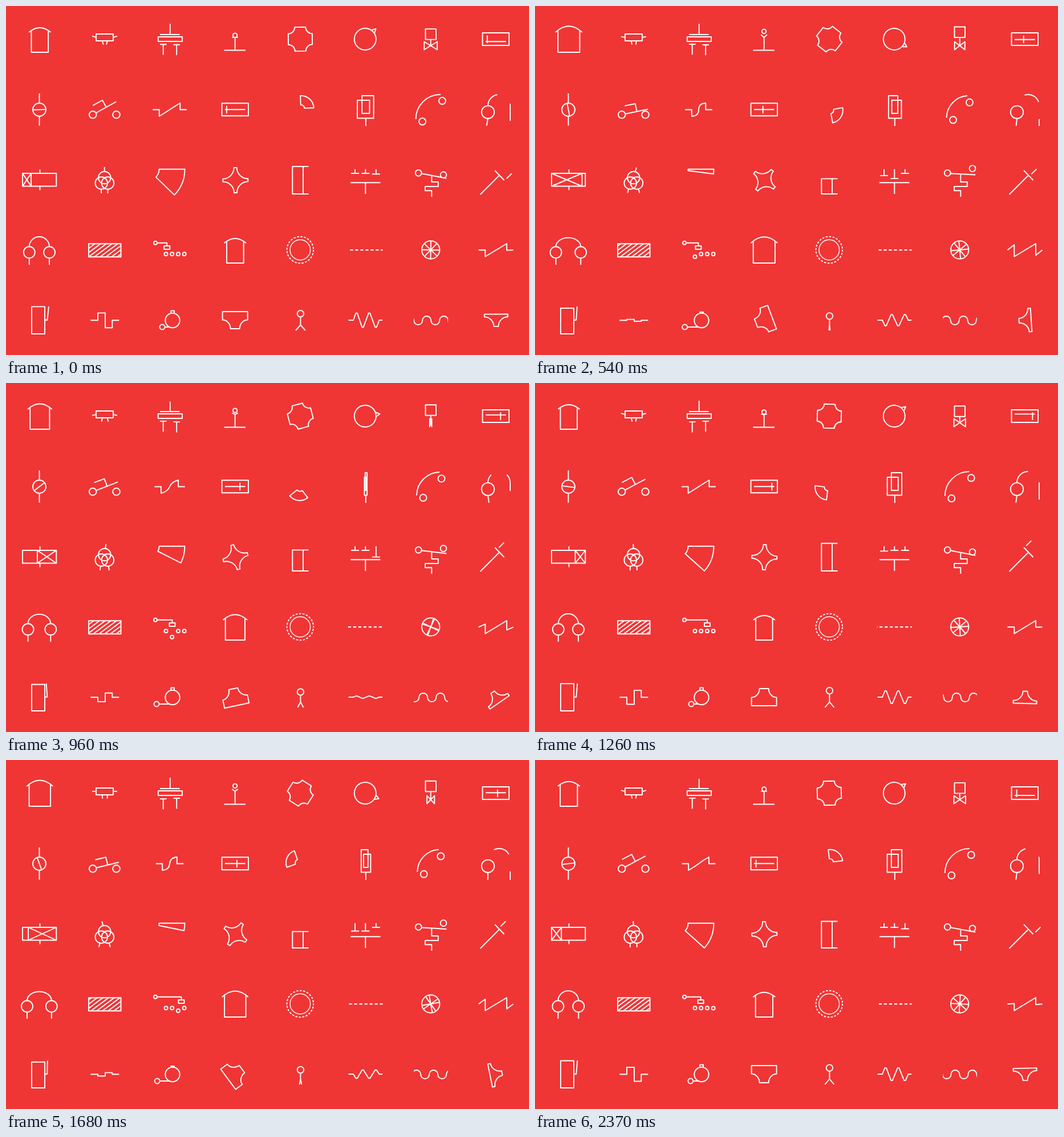
These frames come from a looping animation (917 px wide and 611 px high, 2.4 s). An HTML page with a canvas:

```html
<!DOCTYPE html>
<html>
<head>
<meta charset="utf-8">
<style>
html, body { margin: 0; height: 100%; overflow: hidden; background: #f03535; }
canvas { display: block; }
</style>
</head>
<body>
<canvas width="917" height="611"></canvas>
<script>
const ctx = document.querySelector('canvas').getContext('2d');
const LOOP = 2400;
const rad = Math.PI / 180;
const smooth = x => x * x * (3 - 2 * x);
const smoother = x => x * x * x * (x * (6 * x - 15) + 10);
const clamp = x => Math.max(0, Math.min(1, x));
const bump = (x, peak, width) => Math.max(0, 1 - Math.abs(x - peak) / width);
const circle = (x, y, r) => `M${x + r},${y}a${r},${r} 0 1 1 ${-2 * r},0a${r},${r} 0 1 1 ${2 * r},0Z`;
const box = (x0, y0, x1, y1) => `M${x0},${y0}H${x1}V${y1}H${x0}Z`;
const polar = (x, y, r, deg) => `${x + r * Math.cos(deg * rad)},${y + r * Math.sin(deg * rad)}`;

function draw(d, x = 0, y = 0, deg = 0) {
  ctx.save();
  ctx.translate(x, y);
  ctx.rotate(deg * rad);
  ctx.stroke(new Path2D(d));
  ctx.restore();
}

function clipped(x, y, w, h, paint) {
  ctx.save();
  ctx.beginPath();
  ctx.rect(x, y, w, h);
  ctx.clip();
  paint();
  ctx.restore();
}

function dashed(d, dash, offset, x, y) {
  ctx.setLineDash(dash);
  ctx.lineDashOffset = offset;
  draw(d, x, y);
  ctx.setLineDash([]);
}

// Four flat sides joined by concave corners
function concaveCross(R, h) {
  const arc = `A${R - h},${R - h} 0 0 0 `;
  return `M${-h},${-R}H${h}${arc}${R},${-h}V${h}${arc}${h},${R}H${-h}${arc}${-R},${h}V${-h}${arc}${-h},${-R}Z`;
}

function tee(top, foot, h, shoulder) {
  const arc = `A${top - foot},${h - shoulder} 0 0 0 `;
  return `M${-top},${-h}H${top}V${shoulder}${arc}${foot},${h}H${-foot}${arc}${-top},${shoulder}Z`;
}

function house(x, y, o) {
  const w = 14.7 + 4.6 * o, W = w + 4.2, rise = 8 + 2.8 * o;
  const eave = -35 - rise * (1 - (w / W) ** 2);
  draw(`M${-w},${eave}V0H${w}V${eave}M${-W},-35Q0,${-35 - 2 * rise} ${W},-35`, x, y);
}

function gauge(x, y, lineY, v) {
  const tick = x + 8 + 30 * v;
  draw(box(x, y, x + 46.5, y + 22) + `M${x + 5.5},${lineY}h35.5M${tick},${y + 4.5}v13.5`);
}

function render(now) {
  const t = (now - 15 + LOOP) % LOOP;
  const half = t % 1200, p = half / 1200, P = t / LOOP;
  const u = 1 - Math.abs(1 - 2 * p);
  const v = 1 - Math.abs(1 - 2 * P);
  const flap = 4 * Math.abs(t / 600 % 1 - .5) - 1;
  const o = p < .5 ? smooth(2 * p) : 1 - (2 * p - 1) ** 1.35;
  const flip = 1 - 2 * u;

  ctx.fillStyle = '#f03535';
  ctx.fillRect(0, 0, 917, 611);
  ctx.strokeStyle = '#fff';
  ctx.lineWidth = 1.9;
  ctx.lineJoin = 'round';

  // Row 1
  house(59.3, 81, o);

  draw(box(158, 49, 188, 61) + `M158,55L151,${55 - 2.7 * flap}M188,55L195,${55 - 2.7 * flap}`
    + `M168.8,61.5L${169 + 2 * flap},67.5M177.8,61.5L${177.8 - 2 * flap},67.5`);

  const rod = 31 + 2 * bump(t % 200, 155, 35), hop = .6 * Math.sin(t / 100 * Math.PI);
  draw(`M287.7,${rod}V50M270,50H304.5` + box(266.8, 54, 309, 62)
    + `M270,${67.5 + hop}h11.5m-5.8,0v18.3M293.5,${67.5 - hop}h11.5m-5.8,0v18.3`);

  draw(circle(401.6, 51.5 - 8 * u, 3.7) + 'M382.5,77.5H420M401.6,77.5V55'
    + `M396.3,${55 - 5.5 * u}L401.6,55L406.9,${55 - 5.5 * u}`);

  const turn = 90 * (p + smooth(p)) / 2;
  draw(concaveCross(21, 9.5), 516, 58, turn);

  draw(circle(0, 0, 19) + `M${polar(0, 0, 19, -12)}L26,0L${polar(0, 0, 19, 12)}`, 629.8, 58, -46 + 88 * u);

  const bow = 12 * flip, sy = 40.3 - 4 * o;
  draw(box(735.5, sy, 754, sy + 18.5) + `M744.7,${sy + 18.5}V69.5`
    + `M${744.7 - bow},62.5V76.5L${744.7 + bow},62.5V76.5Z`);

  gauge(835.5, 47, 62.3 - 8.2 * v, v);

  // Row 2
  draw(circle(58.5, 181.5, 11.5) + 'M58.5,153V170M58.5,193V209.5');
  draw('M-11.5,0H11.5', 58.5, 181.5, 180 * p);

  draw(circle(152.2, 190.3, 6.3) + circle(193.5, 190.3, 6.3));
  draw('M6.3,0H47M8,-14H27V0', 152.2, 190.3, -29.5 + 20 * u);

  const zw = 18.5 - 6.5 * o, cx = zw / 2 * (1 - o), cy = 5.75 + 5.75 * o;
  draw(`M${-zw - 11.5},0H${-zw}V11.5Q${-cx},${cy} 0,0Q${cx},${-cy} ${zw},-11.5V0h11.5`, 287, 181.5);

  gauge(378.5, 170.3, 181.3, v);

  draw('M1.5,-24A22.5,22.5 0 0 1 24.3,-1.8H8A6.5,6.5 0 0 0 1.5,-8Z', 515.5, 181, 360 * P);

  const fx = x => 630.8 + x * flip;
  draw(`M${fx(-7)},188V157H${fx(14.5)}V196.5H${fx(-15.5)}V165H${fx(7)}V188ZM630.8,196.5V210`);

  draw(`M${718.5 + 3.5 * u},${198 - 3 * u}A${43 - 4 * u},${43 - 4 * u} 0 0 1 ${762 - 4.5 * u},${155 + 2.2 * u}`
    + circle(765 - 3.5 * u, 166 + 3.2 * u, 6) + circle(730 + 3.5 * u, 202.3 - 3.2 * u, 6));

  draw(circle(845, 185.8, 11.2) + `M845,197L${845 - 2.6 * flap},209.7`);
  dashed('M845,174.5A19.5,19.5 0 0 1 884,174.5V210', [30, 30], -(58 + 60 * p));

  // Row 3
  const left = P < .25 || P > .75 ? 29 : 74 - 45 * u;
  const right = P < .25 || P > .75 ? 43 + 45 * u : 88.3;
  draw(box(29, 293, 88.3, 315.5) + box(left, 293, right, 315.5)
    + `M${left},293L${right},315.5M${left},315.5L${right},293M59.5,286V293M59.5,315.5V322.5`);

  draw(circle(172.8, 300.5, 10.8) + circle(167.2, 310, 10.8) + circle(178.4, 310, 10.8));
  const lean = (P < .5 ? 18 : -18) * u;
  draw('M0,-11V-18.5', 172.8, 300.5, lean);
  draw('M0,11V18', 167.2, 310, 18 * u);
  draw('M0,11V18', 178.4, 310, -18 * u);

  const fan = 45 - 43 * u;
  draw(`M20,0H65A65,65 0 0 1 ${polar(0, 0, 65, fan)}L${polar(0, 0, 20, fan)}A20,20 0 0 0 20,0Z`, 248.5, 285.7);

  draw(concaveCross(22, 2.5), 402.3, 305, turn);

  const lid = 280.3 + 23 * o;
  draw(`M530.5,${lid}H502.3V329H530.5M521,${lid}V329`);

  draw('M604,309.3H656.5M630.3,309.3V329');
  [612, 630.3, 648.8].forEach((x, i) => {
    const y = 293 + 13 * bump(half, 315 + 300 * i, 300);
    draw(`M${x},285.7V${y}M${x - 7},${y}h14`);
  });

  const tip = 302 - 6.8 * o;
  draw(circle(723.2, 292.3, 5.4) + circle(767, 296 - 12 * o, 5.4) + `M728.5,293.3L772.3,${tip}`
    + `M746.3,${(293 + tip) / 2 - .5}V308H757.8V316H735V323.3H746.3V334`);

  draw('M831.5,330L865,296.5M857,287.8L873.5,305');
  draw('M878,302.2L887,293.3', -17.5 * v, -17.8 * v);

  // Row 4
  const ear = 17.5 + 4.5 * o, band = 17.3 - 1.7 * o;
  draw(circle(58.4 - ear, 431.3, 10) + circle(58.4 + ear, 431.3, 10)
    + `M${58.4 - ear},441.3V453M${58.4 + ear},441.3V453`
    + `M${58.4 - ear},421.3A${ear},${band} 0 0 1 ${58.4 + ear},421.3`);

  draw(box(145, 416.3, 201.5, 439.3));
  clipped(145, 416, 56.5, 23.5, () => {
    for (let x = 105 + 10 * p; x < 205; x += 10) draw(`M${x},439.3l31,-23`);
  });

  const STEP = 570, stage = Math.min(3, Math.floor(t / STEP)), since = t - stage * STEP;
  let slot = stage;
  if (stage < 3) slot += smooth(clamp((since - 480) / 90));
  else slot -= 3 * smooth(clamp((since - STEP) / 120));
  const cart = 281 + 10.5 * slot;
  draw(circle(262, 414.8, 3) + `M265,414.8H${cart}V420` + box(cart - 5, 420, cart + 5, 426));
  for (let i = 0; i < 4; i++) {
    const s = t - i * STEP;
    const drop = s < 360 ? bump(s, 360, 210) : bump(s, 360, 290);
    draw(circle(280.5 + 10.7 * i, 434.3 + 11 * drop, 3));
  }

  house(401.8, 450, o);

  ctx.lineWidth = 1.4;
  draw(circle(515.8, 427, 17.8));
  ctx.lineWidth = 1.9;
  const arcStep = 2 * Math.PI * 23.3 / 24;
  dashed(circle(0, 0, 23.3), [arcStep * .58, arcStep * .42], -4 * arcStep * P, 515.8, 427);

  ctx.lineWidth = 2.2;
  dashed('M599.8,427.2H660.5', [5.2, 3.8], -(3.7 + 18 * p));
  ctx.lineWidth = 1.9;

  draw(circle(744.7, 427, 15.7));
  const spokes = 'M-15.7,0H15.7M0,-15.7V15.7';
  draw(spokes, 744.7, 427, -90 * p);
  draw(spokes, 744.7, 427, 45 + 90 * p);

  const kink = 9.7 * o;
  draw(`M828.5,427.3L840.3,${427.3 - kink}V438.8L878,416V${427.3 + kink}L889.5,427.3`);

  // Row 5
  draw(box(45, 526.3 + 2.8 * o, 68, 574) + `M68,549.8H72.3L${72.5 + 2.7 * flap},526`);

  const step = 13.2 * (1 - 2 * v);
  draw(`M148.3,550.3H161V${550.3 - step}H174V${550.3 + step}H186.3V550.3H198.3`);

  const ball = 274 - 19.5 * bump(half, 720, 465), cap = 533.5 + 2.6 * bump(half, 480, 240);
  draw(circle(292, 550.5, 12.7) + circle(ball, 562, 4.5) + `M${ball + 4.5},562H287.5`
    + `M289.2,538V${cap}H295V538`);

  draw(tee(22, 8, 15, -.5), 401.6, 550, 180 * (Math.floor(P * 2) + smoother(p)));

  const neck = 538.6 + 4.4 * o, leg = 8.7 * (1 - u);
  draw(circle(516.4, neck, 5.7) + `M516.4,${neck + 5.7}V558.5M${516.4 - leg},568L516.4,558.5L${516.4 + leg},568`);

  const amp = 13 * flip;
  let coil = 'M600.5,550H609';
  [614.7, 625.5, 637, 648.5].forEach((x, i) => {
    coil += `L${x - 1.2},${550 + (i % 2 ? amp : -amp)}h2.4`;
  });
  draw(coil + 'L654.5,550H660');

  clipped(715, 540, 60, 22, () => {
    let wave = `M${670.5 + 30 * p},550.5`;
    for (let i = 0; i < 4; i++) wave += 'a7.5,7.5 0 0 1 15,0a7.5,7.5 0 0 0 15,0';
    draw(wave);
  });

  const quarter = P * 4;
  draw(tee(20.5, 4, 10.7, -6), 859.3, 550.3, 90 * (Math.floor(quarter) + smooth(quarter % 1)));
}

function tick() {
  render(performance.now() % LOOP);
  requestAnimationFrame(tick);
}
tick();
</script>
</body>
</html>
```
